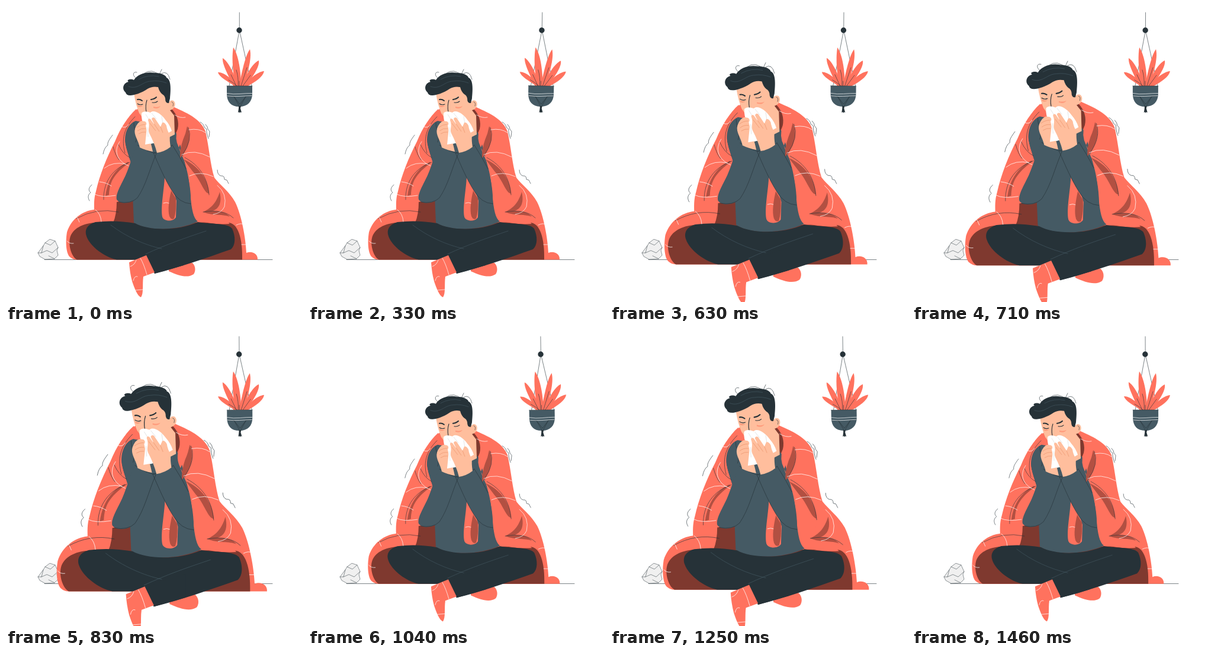
An HTML page for the animation above (1500 ms loop, 500 px wide and 500 px high).

```html
<!DOCTYPE html>
<html lang="en">
<head>
<meta charset="utf-8">
<title>Shivering under a blanket</title>
<style>
  html, body { margin: 0; width: 100%; height: 100%; overflow: hidden; background: #fff; }
  svg { display: block; width: 100%; height: 100%; }
  .coral { fill: #ff725e; }
  .fold { fill: #b25042; }
  .inner { fill: #7f392f; }
  .slate { fill: #455a64; }
  .dark { fill: #263238; }
  .skin { fill: #ffbe9d; }
  .blush { fill: #ff9a7b; }
  .ink, .chalk, .seam { fill: none; stroke: #263238; stroke-width: .6; stroke-linecap: round; stroke-linejoin: round; }
  .chalk { stroke: #fff; stroke-width: .7; }
  .seam { stroke: #455a64; }
</style>
</head>
<body>
<svg viewBox="0 0 500 500">
  <path class="ink" d="M65 428.5H450"/>

  <g id="paper">
    <path fill="#f0f0f0" stroke="#263238" stroke-width=".5" d="M54 417 63 405 66 400 74 394 83 397 88 408 86 413 88 421 82 427 66 428 57 423Z"/>
    <path class="ink" style="stroke-width:.5" d="M66 400 75 404 83 397M63 405 60 417 54 417M60 417 69 413 78 417 88 408M72 422 82 427"/>
  </g>

  <g id="plant">
    <path class="ink" d="M394.3 11V41L377 135M394.3 41 415 135"/>
    <circle class="dark" cx="394" cy="41" r="4.7"/>
    <g class="coral">
      <path d="M386 135C374 127 360 120 358 112C367 111 382 123 392 135Z"/>
      <path d="M384 135C375 116 365 98 366 88C375 93 387 116 391 135Z"/>
      <path d="M388 135C383 114 381 86 384 70C393 83 397 112 397 135Z"/>
      <path d="M394 135C398 111 405 82 412 73C416 89 407 117 401 135Z"/>
      <path d="M398 135C405 117 416 97 427 92C429 103 415 122 405 135Z"/>
      <path d="M402 135C409 125 424 111 436 110C434 120 421 128 409 135Z"/>
    </g>
    <path class="ink" d="M376 125Q385 130 390 135M380 116 389 135M389 108Q393 120 392 135M407 104 397 135M413 117 400 135M394 127V135"/>
    <path class="slate" d="M373 135H416V148C416 162 408 170 394 170S373 162 373 148Z"/>
    <path class="ink" d="M373 135H416M374 152 385 153 395 171 405 153 415 151M385 153 395 166 405 153"/>
    <path class="chalk" d="M373 147.500q11 2 22 1t21-1M374 152q10 1 20 .5t21-1"/>
    <path class="dark" d="M393 169h4l-1 4 2 7-2-1-1 2-1-2-2 1 1-7Z"/>
  </g>

  <g id="person">
    <path class="ink" d="M180 218C174 226 171 231 172 235Q166 239 164 250M145 302C139 307 139 312 143 315C138 319 138 324 141 329M328 196Q334 199 335 205L339 208Q338 214 342 224M337 200Q341 204 341 208L344 212 343 221M357 277Q357 285 363 287Q369 286 369 293L373 294 376 300"/>

    <path class="coral" d="M222 174C205 187 194 205 184 229C170 256 158 286 152 313C148 326 149 337 149 344C129 346 110 360 103 382C100 400 102 419 108 424Q113 428.600 120 428.600H425C426 418 415 413 406 417C405 393 398 353 387 331C377 313 361 302 352 290C345 268 343 238 337 212C330 193 310 182 284 171Z"/>
    <path class="inner" d="M120 428.600C111 424 105 405 108 392C112 376 130 367 150 366L190 364L375 366C392 366 400 393 399 428.600Z"/>
    <path class="inner" d="M187 331 218 327V366H181Q187 352 187 331Z"/>

    <path class="fold" d="M209 262C187 272 172 291 168 321L174 319C175 298 181 284 209 264Z"/>
    <path class="inner" d="M276 171Q293 176 295 196L285 220 268 211Z"/>

    <path class="slate" d="M219 194C204 200 199 219 202 235C205 252 213 264 212 275L216 366C240 382 292 379 324 364C309 353 314 304 304 272L290 218 279 205Z"/>
    <path class="coral" d="M220 174 223 191C207 198 198 212 201 230C204 248 210 256 209 268Q196 249 192 229C195 206 204 188 220 174Z"/>
    <path class="coral" d="M284 171C299 180 305 193 302 207Q298 225 292 239Q284 224 290 208Q294 189 280 174Z"/>
    <path class="coral" d="M292 239C296 254 306 265 310 290C314 312 309 341 323 362Q350 370 378 368L350 342C331 318 319 281 302 260Z"/>
    <path class="fold" d="M306 203C314 219 309 240 294 257Q293 243 299 226Q304 215 306 203Z"/>
    <path class="fold" d="M300 259C323 269 341 290 343 317C334 316 329 294 315 279Z"/>
    <path class="fold" d="M361 314C355 333 347 341 333 348C354 349 367 340 361 314Z"/>
    <path class="fold" d="M333 348C353 345 370 346 378 356C367 351 350 355 333 348Z"/>
    <path class="coral" d="M268 289C267 311 261 339 264 356C266 364 282 365 287 357L288 329C285 317 279 303 271 290Z"/>
    <path class="fold" d="M279 312C275 329 273 345 276 355Q279 362 284 359Q288 346 287 325Z"/>

    <path class="coral" d="M275 443C287 433 303 431 315 434C320 439 321 447 317 453C307 460 292 456 275 448Z"/>
    <path class="dark" d="M151 365C137 369 132 378 136 389C142 406 166 424 187 428.600H237L251 452C292 442 340 425 380 411C388 404 388 389 382 376C374 366 346 369 324 365C291 380 242 380 218 367Q184 361 151 365Z"/>
    <path class="dark" d="M237 422 251 452 300 438V402Z"/>
    <path class="seam" d="M177 370C203 390 235 404 263 410"/>
    <path class="ink" style="stroke:#455a64" d="M338 380C305 391 270 403 236 419"/>
    <path class="coral" d="M208 433 237 421 251 450 232 457C230 470 233 485 228 492C222 490 217 477 213 465Q209 450 208 433Z"/>
    <path class="chalk" d="M227 426Q233 436 238 454M210 440Q218 437 220 429M215 464Q217 455 222 457M219 480 231 479"/>

    <path class="slate" d="M222 235C214 250 211 265 202 286C193 305 185 317 187 327C193 336 213 334 222 324C236 302 242 276 254 249Q242 246 222 235Z"/>
    <path class="slate" d="M249 248C258 269 267 291 281 313C288 326 299 337 312 334C313 318 310 294 304 277Q293 255 281 235Q267 246 249 248Z"/>
    <path class="ink" d="M222 235Q240 247 254 249C242 277 237 302 222 324Q211 335 190 331M281 235Q267 246 249 248C260 273 269 294 281 313Q293 333 312 334M281 235Q293 253 304 275M216 197C216 211 223 219 219 230"/>

    <path class="ink" d="M218 187C198 207 195 226 201 248M209 256Q197 250 190 234M209 264C182 273 164 296 165 327M181 238Q185 253 191 260M302 256C327 269 341 291 343 319M298 252Q316 226 308 205M333 348Q367 342 384 358M119 359Q153 340 190 348"/>
    <path class="chalk" d="M192 229C182 244 186 261 207 270M166 274Q181 262 202 267M158 297Q169 298 178 304M150 318Q161 324 185 320M151 344Q160 351 161 364M117 354Q122 358 124 365M103 397Q107 402 114 401M196 204Q203 207 207 200M285 184Q294 190 303 188M309 209Q326 206 337 214M297 251Q318 241 344 255M310 287Q328 278 350 288M357 303Q374 317 369 339Q364 350 350 352M389 370Q397 366 401 369M398 403H405M266 333Q271 331 275 333"/>

    <path class="skin" d="M216 147Q219 167 225 181L239 200 275 222 285 217 284 185Q280 180 277 176C286 174 288 164 283 160Q278 158 276 162L268 128 244 128Z"/>
    <path class="ink" d="M280 162Q284 163 282 169"/>
    <path class="blush" d="M249 170q7 2 12-1-4 6-12 3ZM222 167q6 3 10 1-4 4-9 2Z"/>
    <path class="dark" d="M202 146C195 140 198 130 207 128C202 125 211 122 216 125C222 115 237 110 252 113C264 113 271 118 271 121C280 124 278 145 277 156L275 164Q269 165 269 156Q268 151 264 149Q259 145 257 137Q247 135 239 140C229 147 216 151 210 151Q203 151 202 146Z"/>
    <path class="seam" d="M207 136C223 142 231 127 245 127Q258 125 271 130M224 124Q240 115 258 119"/>
    <path class="ink" d="M220 122C213 118 214 110 221 112M233 114Q246 104 261 118M259 118Q260 112 263 107M263 114Q273 108 277 124"/>
    <path class="ink" style="stroke-width:2" d="M222 158q4-1 8 2M245 158q6-1 9-4"/>
    <path class="ink" style="stroke-width:1.1" d="M222 165q4 3 9 1M247 163q6 1 9-2M238 159Q235 168 237 179"/>

    <path fill="#fff" d="M229 181Q233 176 244 180C250 174 263 183 269 192Q277 201 280 211L266 219 260 229 236 235 234 203Q228 193 229 181Z"/>
    <path class="skin" d="M218 207Q222 196 229 194L235 195Q239 198 236 202L239 216Q244 227 248 246Q236 244 226 239C224 227 215 218 218 207Z"/>
    <path fill="#fff" d="M239 194 237 215 235 234 252 231 246 205Z"/>
    <path fill="none" stroke="#dbdbdb" stroke-width=".7" d="M236 183 241 191M246 181 254 191M263 186 265 200M239 205 240 221"/>
    <path class="skin" d="M240 193Q240 189 244 191L251 201 246 191Q247 187 251 189L261 204 264 197Q268 196 271 202Q272 210 277 218Q276 227 278 238Q268 246 255 248Q251 232 242 215C239 207 244 204 240 193Z"/>
    <path fill="none" stroke="#eb966f" stroke-width=".7" d="M221 205q6-5 14-5M222 211q6-5 14-4M224 216q6-4 12-3M243 198 253 211M250 199 259 212M261 204 265 214"/>
  </g>
</svg>
<script>
const LOOP = 1500;
const person = document.getElementById('person');
const plant = document.getElementById('plant');

// [time in ms, scale]: rest, slow swell, quick release, second beat
const beats = [[0, 1], [400, 1], [540, 1.044], [710, 1.073], [840, 1.1], [1045, 1], [1260, 1.08], [1465, 1], [LOOP, 1]];

function scaleAt(t) {
  const i = beats.findIndex(([end]) => end > t);
  const [t0, s0] = beats[i - 1], [t1, s1] = beats[i];
  return s0 + (s1 - s0) * (t - t0) / (t1 - t0);
}

function draw(now) {
  const t = now % LOOP;
  person.setAttribute('transform', `translate(263 297) scale(${scaleAt(t)}) translate(-263 -297)`);
  plant.setAttribute('transform', `rotate(${Math.sin(t / LOOP * 2 * Math.PI)} 397 96)`);
  requestAnimationFrame(() => draw(performance.now()));
}
draw(performance.now());
</script>
</body>
</html>
```
